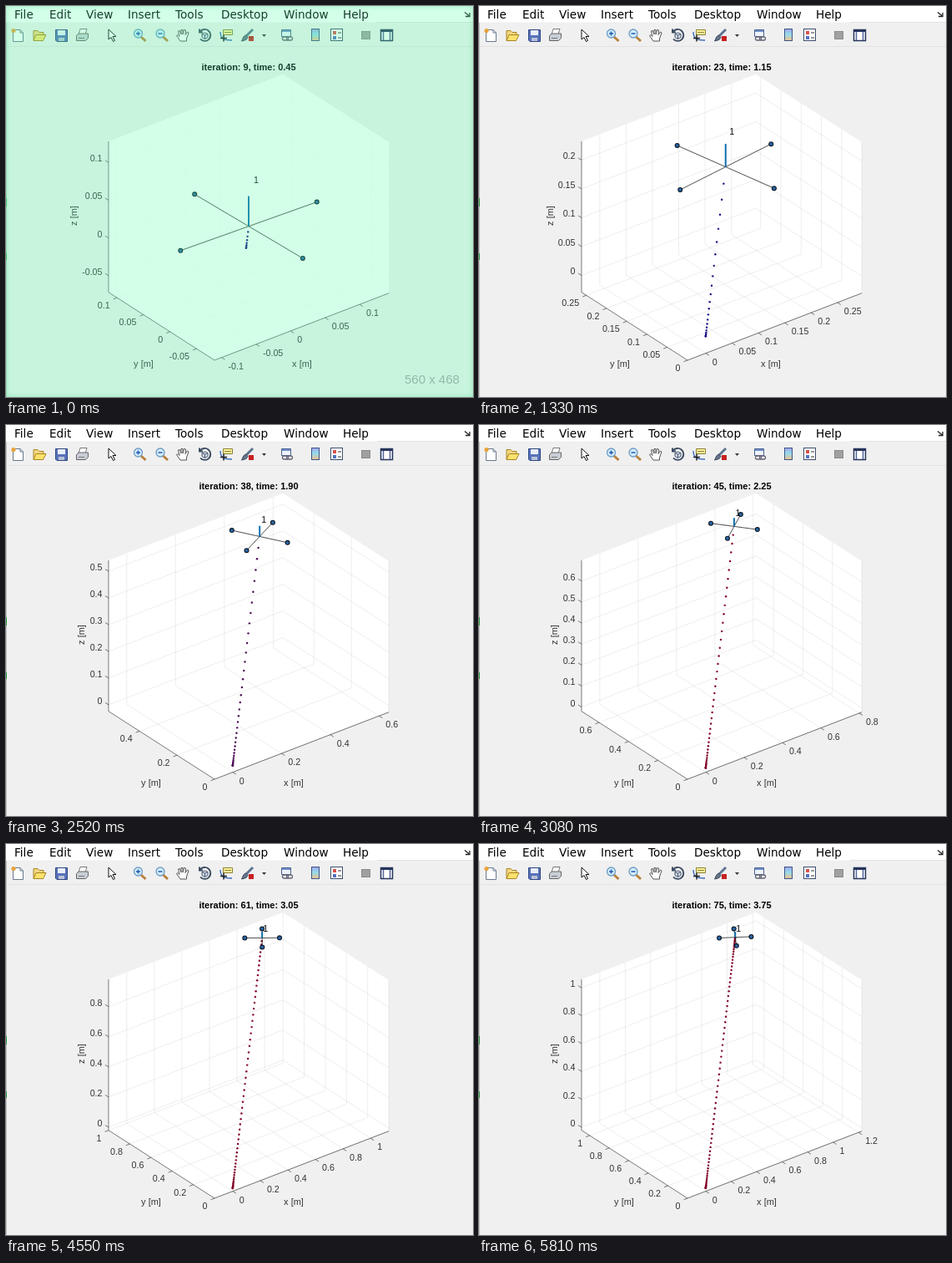
These frames come from a looping animation (560x468 px, 5.88 s). An HTML page with a canvas:

```html
<!DOCTYPE html>
<html lang="en">
<head>
<meta charset="utf-8">
<title>Quadrotor trajectory</title>
<style>
  html, body { margin: 0; width: 560px; height: 468px; overflow: hidden; background: #f0f0f0; }
  svg, canvas, #tint, #veil { position: absolute; left: 0; top: 0; width: 560px; height: 468px; }
  #veil { background: rgba(80, 255, 165, .25); box-shadow: inset 0 0 6px rgba(120, 225, 170, .7); }
  #size { position: absolute; left: 478px; top: 438px; font: 15px/18px "Liberation Sans", Arial, sans-serif; color: #93b8a7; white-space: nowrap; }
  .menu text { font: 13.6px "DejaVu Sans", sans-serif; fill: #000; }
</style>
</head>
<body>
<svg viewBox="0 0 560 468" fill="none">
  <rect width="560" height="468" fill="#f0f0f0"/>
  <rect width="560" height="19.5" fill="#fff"/>
  <path d="M445 19.5H560M0 48.5H560" stroke="#e2e2e2"/>
  <path d="M.5 20V468" stroke="#c4c4c4"/>
  <path d="M.5 230V240M.5 296V304" stroke="#2c9a3c"/>
  <g class="menu">
    <text x="10" y="15">File</text><text x="52" y="15">Edit</text>
    <text x="96" y="15">View</text><text x="146" y="15">Insert</text>
    <text x="203" y="15">Tools</text><text x="258" y="15">Desktop</text>
    <text x="333" y="15">Window</text><text x="404" y="15">Help</text>
  </g>
  <path d="M550 7.500L555 11.500M556 8V12.500H551" stroke="#222" stroke-width="1.300"/>

  <!-- new, open, save, print -->
  <path d="M8.500 28.500H17L20.500 32V42.500H8.500Z" fill="#fff" stroke="#68798d"/>
  <path d="M17 28.500V32H20.500" stroke="#68798d"/>
  <circle cx="9" cy="29.500" r="2.600" fill="#e7a33b"/>
  <path d="M33 41V29.500H38L40 31.500H45V34" fill="#f3d680" stroke="#a98422"/>
  <path d="M33 41.500L36 34.500H48L44.500 41.500Z" fill="#fbe26c" stroke="#a98422"/>
  <path d="M59.500 28.500H73.500V42.500H61L59.500 41Z" fill="#5872ba" stroke="#304681"/>
  <path d="M62 29H71V35H62Z" fill="#e9eefb"/><path d="M63 38H70V42H63Z" fill="#b9c2d8"/>
  <path d="M87 34L89 27.500H97L95 34" fill="#fff" stroke="#777"/>
  <path d="M84.500 35.500L87 33H98.500V38.500L95.500 41.500H84.500Z" fill="#c9ced6" stroke="#666"/>
  <path d="M87 38.500H94" stroke="#777"/>

  <!-- pointer, zooms, pan -->
  <path d="M123 28V40L126 37.500L128.500 42.500L130.500 41.500L128 36.500H132Z" fill="#fff" stroke="#111"/>
  <g id="lens">
    <path d="M162 37L167.500 42" stroke="#b8823b" stroke-width="3"/>
    <circle cx="158.500" cy="33" r="5" fill="#d4ecfb" stroke="#6b9cc4" stroke-width="1.300"/>
    <path d="M156 33H161" stroke="#225cb0" stroke-width="1.500"/>
  </g>
  <path d="M158.500 30.500V35.500" stroke="#225cb0" stroke-width="1.500"/>
  <use href="#lens" x="26.500"/>
  <path d="M209 42L204.500 35.500L206 34.500L208 36.500L206.500 30L208.300 29.500L210 34V28.500H212V34L213.500 28.500L215.500 29L215 34.500L217.500 31L219 32L216.500 39V42Z" fill="#fff" stroke="#555"/>

  <!-- rotate, data cursor, brush -->
  <path d="M235 33.500L238.500 32L242 33.500V37.500L238.500 39.500L235 37.500ZM235 33.500L238.500 35L242 33.500M238.500 35V39" fill="#d8dfeb" stroke="#43536d"/>
  <path d="M232.500 31A7 7 0 1 1 233 39.500M232 27.500V31.500H236" stroke="#3a4a60" stroke-width="1.900"/>
  <path d="M260.500 28.500H271.500V34.500H260.500Z" fill="#fff59a" stroke="#8a8037"/>
  <path d="M262 31.500H270" stroke="#8a8037"/>
  <path d="M257 31C257 40 263 41 271 41" stroke="#2d61b5" stroke-width="1.300"/>
  <path d="M261 34.500V42.500M257 38.500H265" stroke="#222" stroke-width="1.500"/>
  <path d="M288 36L296 28" stroke="#5d7390" stroke-width="3"/>
  <path d="M282.500 42C284 40 284 36 287.500 35L290 37.500C289 41 286 41 282.500 42Z" fill="#66778c" stroke="#38465a"/>
  <rect x="291" y="36" width="6" height="6" fill="#c62020"/>
  <path d="M307 34H312L309.500 37Z" fill="#333"/>

  <!-- link, colorbar, legend, plot tools -->
  <path d="M330.500 28.500H341.500V36.500H330.500Z" fill="#edf2fb" stroke="#4b6291"/>
  <path d="M331 30H341" stroke="#6f8fc9" stroke-width="2"/>
  <rect x="331.500" y="37" width="7" height="4" rx="2" stroke="#667" stroke-width="1.300"/>
  <rect x="336.500" y="37" width="7" height="4" rx="2" stroke="#667" stroke-width="1.300"/>
  <linearGradient id="bar" x2="0" y2="1"><stop stop-color="#a5a2ea"/><stop offset=".45" stop-color="#92dcec"/><stop offset="1" stop-color="#f0bf8c"/></linearGradient>
  <rect x="366.500" y="27.500" width="9" height="14" fill="url(#bar)" stroke="#3d5585"/>
  <rect x="389.500" y="27.500" width="14" height="14" fill="#fff" stroke="#3d4d6d"/>
  <path d="M392 30H396V34H392Z" fill="#d8524a"/><path d="M392 36H396V40H392Z" fill="#5372c4"/>
  <path d="M398 32H402M398 38H402" stroke="#333"/>
  <rect x="426.500" y="30.500" width="10" height="9" fill="#a0a0a0" stroke="#8b8b8b"/>
  <rect x="449.500" y="28.500" width="14" height="13" fill="#fff" stroke="#26345c" stroke-width="1.500"/>
  <path d="M449 30H464" stroke="#26345c" stroke-width="2"/>
  <path d="M452.500 31V41M460.500 31V41" stroke="#53659a" stroke-width="1.500"/>
</svg>
<canvas id="plot" width="560" height="468"></canvas>
<div id="tint"><div id="veil"></div><div id="size">560 x 468</div></div>
<script>
const ctx = document.getElementById('plot').getContext('2d');
const tint = document.getElementById('tint');
const STEP = 70, FRAMES = 84;
const ARM = .1, MAST = .04;
const FACE = '"Liberation Sans", Arial, sans-serif';
const FONT = '11px ' + FACE, SMALL = '10.7px ' + FACE;
const INK = '#333';
// [picture, simulation iteration]; the simulation runs at an uneven pace
const PACE = [[0, 9], [6, 14], [19, 23], [28, 31], [44, 45], [65, 61], [83, 75]];

function iterationAt(n) {
  const j = Math.max(1, PACE.findIndex(p => p[0] >= n));
  const [n0, i0] = PACE[j - 1], [n1, i1] = PACE[j];
  return Math.floor(i0 + (i1 - i0) * (n - n0) / (n1 - n0) + 1e-6);
}

// Minimum-jerk distance along x = y = z (also the yaw in radians)
function travel(i) {
  const u = Math.min(1, (i + 1) / 80);
  return u ** 3 * (10 - 15 * u + 6 * u * u);
}

// Equal-aspect axis limits that keep the vehicle and its path in view
function makeView(s) {
  const reach = ARM * Math.max(Math.cos(s), Math.sin(s));
  const y0 = Math.min(0, s - reach);
  const range = s + reach - y0;
  const min = [y0 - .132 * range, y0, (s + MAST - range) / 2];
  const max = [min[0] + 1.264 * range, y0 + range, min[2] + range];
  const k = 208.6 / range;
  const project = (x, y, z) => {
    const a = (x - min[0]) * k, b = (y - min[1]) * k, c = (z - min[2]) * k;
    return [250 + .793 * a - .609 * b, 424 - .3045 * a - .39 * b - .866 * c];
  };
  return { range, min, max, k, project };
}

function line(points, color, width) {
  ctx.beginPath();
  points.forEach(p => ctx.lineTo(p[0], p[1]));
  ctx.strokeStyle = color;
  ctx.lineWidth = width;
  ctx.stroke();
}

function disc([x, y], r, fill) {
  ctx.beginPath();
  ctx.arc(x, y, r, 0, 7);
  ctx.fillStyle = fill;
  ctx.fill();
}

function text(str, x, y, align = 'center', font = FONT, color = INK) {
  ctx.font = font;
  ctx.textAlign = align;
  ctx.textBaseline = 'middle';
  ctx.fillStyle = color;
  ctx.fillText(str, x, y);
}

function ticks(view, axis) {
  const limit = axis === 2 ? 8.7 : 5.6;
  const step = [.05, .1, .2].find(d => view.range / d <= limit) || .2;
  const list = [];
  for (let i = Math.ceil(view.min[axis] / step - 1e-6); i * step <= view.max[axis] + 1e-9; i++) {
    list.push(+(i * step).toFixed(2));
  }
  // 0: negative labels, 1: two decimals, 2: short labels
  list.kind = step > .05 ? 2 : list[0] < 0 ? 0 : 1;
  return list;
}

function drawAxes(view, gridAlpha) {
  const { min: [x0, y0, z0], max: [x1, y1, z1], project: p } = view;
  const [tx, ty, tz] = [0, 1, 2].map(a => ticks(view, a));

  ctx.beginPath();
  [p(x0, y0, z0), p(x1, y0, z0), p(x1, y0, z1), p(x1, y1, z1), p(x0, y1, z1), p(x0, y1, z0)]
    .forEach(q => ctx.lineTo(...q));
  ctx.fillStyle = '#fff';
  ctx.fill();

  const grid = `rgba(38,38,38,${.08 * gridAlpha})`;
  tx.forEach(v => line([p(v, y0, z0), p(v, y1, z0), p(v, y1, z1)], grid, 1));
  ty.forEach(v => line([p(x0, v, z0), p(x1, v, z0), p(x1, v, z1)], grid, 1));
  tz.forEach(v => line([p(x0, y1, v), p(x1, y1, v), p(x1, y0, v)], grid, 1));

  line([p(x0, y1, z1), p(x0, y1, z0), p(x0, y0, z0), p(x1, y0, z0)], INK, .65);
  const tick = (q, dx, dy) => line([q, [q[0] + dx, q[1] + dy]], INK, .65);
  tx.forEach(v => {
    const q = p(v, y0, z0);
    tick(q, 4, 2.5);
    text(v, q[0] + 8, q[1] + 11, 'left', SMALL);
  });
  ty.forEach(v => {
    const q = p(x0, v, z0);
    tick(q, -4.5, 1.7);
    text(v, q[0] - 8.5, q[1] + 10, 'right', SMALL);
  });
  tz.forEach(v => {
    const q = p(x0, y1, v);
    tick(q, -4, -2.5);
    text(v, 115.5, q[1] - 4, 'right', SMALL);
  });

  text('x [m]', [355, 350, 345][tx.kind], 429);
  text('y [m]', [165, 169, 174][ty.kind], 429);
  ctx.save();
  ctx.translate([82, 86, 91][tz.kind], 251);
  ctx.rotate(-Math.PI / 2);
  text('z [m]', 0, 0);
  ctx.restore();
}

function drawPath(view, iter) {
  const f = Math.min(1, Math.max(0, (iter - 31) / 14));
  const color = `rgb(${20 + 110 * f},${15 - 15 * f},${130 - 90 * f})`;
  for (let i = 0; i < iter; i++) {
    const s = travel(i);
    disc(view.project(s, s, s), 1.2, color);
  }
}

function drawVehicle(view, s) {
  const { k, project } = view;
  const [cx, cy] = project(s, s, s);
  const turn = s + 37.5 * Math.PI / 180;
  const c = ARM * k * Math.cos(turn), n = ARM * k * Math.sin(turn);
  const pitch = .0033 * k * Math.max(-.9, 1 - 2.2 * s);
  const roll = -.0025 * k * (1 - s);
  const arms = [[c, -n / 2 + pitch], [n, c / 2 + roll]]
    .map(([dx, dy]) => [[cx - dx, cy - dy], [cx + dx, cy + dy]]);

  arms.forEach(a => line(a, '#222', .8));
  line([[cx, cy], project(s, s, s + MAST)], '#0f6fb0', 2);
  arms.flat().forEach(q => {
    disc(q, 3, '#0b1622');
    disc(q, 1.9, '#2a66a8');
  });
  text('1', cx + .0058 * k, cy - .052 * k, 'left', SMALL, '#111');
}

function draw(n) {
  const iter = iterationAt(n), s = travel(iter), view = makeView(s);
  const fade = Math.max(0, 1 - n / 5);
  ctx.clearRect(0, 0, 560, 468);
  drawAxes(view, 1 - .75 * fade);
  drawPath(view, iter);
  drawVehicle(view, s);
  text(`iteration: ${iter}, time: ${(iter * .05).toFixed(2)}`, 291, 74, 'center', 'bold ' + FONT, '#000');
  tint.style.opacity = fade;
}

const start = performance.now();
let shown = -1;
function loop() {
  const n = Math.floor((performance.now() - start) / STEP) % FRAMES;
  if (n !== shown) draw(shown = n);
  requestAnimationFrame(loop);
}
loop();
</script>
</body>
</html>
```
